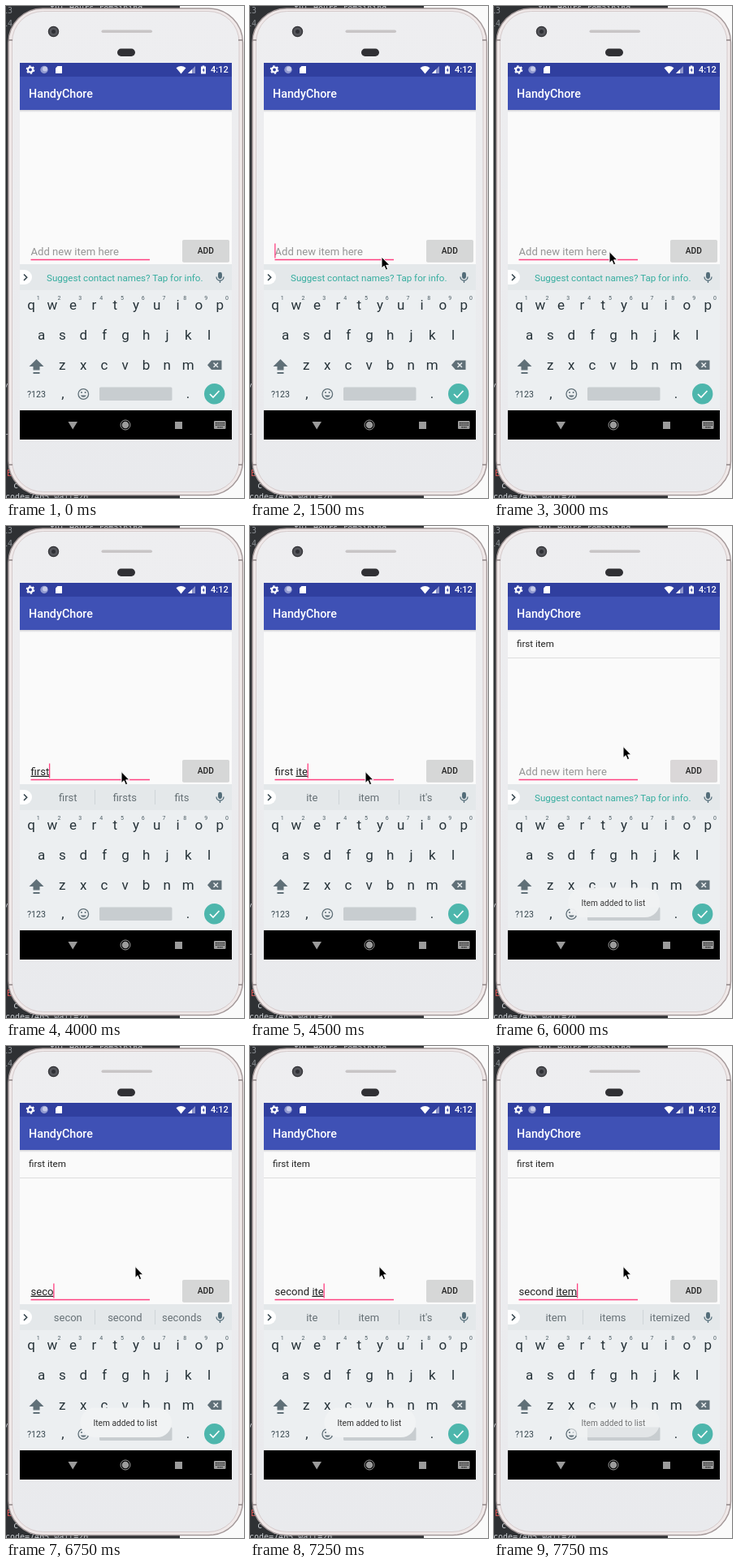
Recreate the animation shown at these times as an HTML page. Size 293 by 606 pixels, loop 8 s.

```html
<!DOCTYPE html>
<html lang="en">
<head>
<meta charset="utf-8">
<style>
  html, body { margin: 0; width: 100%; height: 100%; overflow: hidden; background: #fafafa; }
  svg { display: block; width: 293px; height: 606px; font-family: Roboto, sans-serif; }
  text { white-space: pre; }
  .mid { text-anchor: middle; }
  .code { font: 10px "DejaVu Sans Mono", monospace; fill: #c9cdd2; }
  .word { font-size: 13px; fill: #667075; }
  .key { font-size: 17px; fill: #263238; }
  .digit { font-size: 7px; fill: #4c5c64; }
</style>
</head>
<body>
<svg viewBox="0 0 293 606">
  <defs>
    <linearGradient id="body" x2="0" y2="1">
      <stop stop-color="#eeeef0"/><stop offset="1" stop-color="#e9eaed"/>
    </linearGradient>
    <linearGradient id="shade" x2="0" y2="1">
      <stop stop-color="#cfcfd4"/><stop offset="1" stop-color="#fafafa"/>
    </linearGradient>
  </defs>

  <!-- editor behind the phone -->
  <path d="M0 0H214V606H0z" fill="#2f3134"/>
  <g class="code">
    <text x="-4" y="9" fill="#8b8f94">13</text>
    <text x="-4" y="25" fill="#8b8f94">14</text>
    <text x="54" y="6">ful Hours remaining</text>
    <text x="-3" y="473">/</text><text x="-3" y="533">r</text>
    <text x="1" y="579" style="fill:#e05555">E</text>
    <text x="9" y="594">c</text>
    <text x="-1" y="608">code=7405 wait=20</text>
  </g>

  <!-- phone -->
  <rect x="3" y="3" width="288.500" height="599.500" rx="42" fill="#f0e9e9" stroke="#a59a9b" stroke-width="1.500"/>
  <rect x="7.500" y="6.500" width="279.500" height="592" rx="38" fill="url(#body)" stroke="#d5cacb"/>
  <path d="M3 565H8M286 565H291M3 42H8M286 42H291" stroke="#8f8586" stroke-width="1.500"/>
  <circle cx="58.500" cy="31.500" r="6" fill="#55565b" stroke="#38383c" stroke-width="1.500"/>
  <circle cx="58.500" cy="31.500" r="2.500" fill="#2f3035"/>
  <rect x="117.500" y="29.500" width="62.500" height="3.500" rx="1.700" fill="#c8c5c6"/>
  <rect x="137" y="52.500" width="22" height="9.500" rx="4.700" fill="#303034"/>

  <!-- app -->
  <path d="M17 70H278V534H17z" fill="#fafafa"/>
  <path d="M17 70H278V87H17z" fill="#303f9f"/>
  <path d="M17 87H278V128H17z" fill="#3f51b5"/>
  <path d="M17 128H278V131H17z" fill="url(#shade)"/>
  <g fill="#fff">
    <circle cx="30" cy="78.500" r="3" fill="none" stroke="#fff" stroke-width="2.200"/>
    <circle cx="30" cy="78.500" r="4.600" fill="none" stroke="#fff" stroke-width="1.500" stroke-dasharray="2.400 2.417"/>
    <circle cx="47" cy="78.500" r="4.700" fill="#8f98cf"/><circle cx="48" cy="77.500" r="3" fill="#c5cae9"/>
    <path d="M63.500 74H69V83H61V76.500z"/>
    <path d="M209.500 76.300Q215.500 71.500 221.500 76.300L215.500 83.500z"/>
    <path d="M233 74V83H224z" opacity=".45"/><path d="M229 78V83H224z"/>
    <path d="M241.700 73.500H244.300V74.500H246V83.500H240V74.500H241.700z"/>
    <path d="M243.700 76L241.600 79.500H243V82L244.700 78.500H243.700z" fill="#303f9f"/>
    <text x="252" y="82.300" font-size="11" font-weight="500">4:12</text>
    <text x="28" y="112.500" font-size="14.300" font-weight="500">HandyChore</text>
  </g>
  <g id="row">
    <text x="28" y="149.300" font-size="11.600" fill="#222">first item</text>
    <path d="M17 162.500H278" stroke="#dedede"/>
  </g>
  <text id="hint" x="30.500" y="306.700" font-size="13.100" fill="#959595">Add new item here</text>
  <text id="entry" x="30.500" y="306.700" font-size="13.100" fill="#222"><tspan id="done"></tspan><tspan id="typing" text-decoration="underline"></tspan></text>
  <path d="M30.500 312.500H177" stroke="#ff4081" stroke-width="1.400"/>
  <rect id="caret" y="292.500" width="1.300" height="18" fill="#ff4081"/>
  <rect x="217" y="288.800" width="58" height="27" rx="2" fill="#b9b9b9" opacity=".6"/>
  <rect id="button" x="217" y="288" width="58" height="26.800" rx="2"/>
  <text class="mid" x="245.800" y="304.800" font-size="10.200" font-weight="500" fill="#222">ADD</text>

  <!-- keyboard -->
  <path d="M17 318H278V350H17z" fill="#e4e8ea"/>
  <path d="M17 350H278V499H17z" fill="#eceff1"/>
  <path d="M17 325H23A9 9 0 0 1 23 343H17z" fill="#fff"/>
  <path d="M22 330.500L25.700 334.200L22 338" fill="none" stroke="#37474f" stroke-width="1.600"/>
  <text id="tip" x="50" y="338.800" font-size="11.600" fill="#35ad9f">Suggest contact names? Tap for info.</text>
  <g id="words">
    <path d="M109.500 325V343M183.500 325V343" stroke="#cfd5d8"/>
    <text class="word mid" x="76.300" y="338.800"></text>
    <text class="word mid" x="146.300" y="338.800"></text>
    <text class="word mid" x="216.500" y="338.800"></text>
  </g>
  <g fill="none" stroke="#546e7a" stroke-width="1.300">
    <rect x="261.700" y="328.500" width="3.600" height="7" rx="1.800" fill="#546e7a"/>
    <path d="M259 333.500A4.500 4.700 0 0 0 268 333.500M263.500 338V341"/>
  </g>
  <g id="keys"></g>
  <g fill="#607078">
    <path d="M37.500 435L46.500 444H41.500V448.500H33.500V444H28.500z"/><path d="M33.500 451H41.500V453H33.500z"/>
    <path d="M253 436.500H265.500V448H253L248 442.200z"/>
    <path d="M255.500 439.500L261 445M261 439.500L255.500 445" stroke="#eceff1" stroke-width="1.400"/>
    <text x="26" y="481.800" font-size="10.600" fill="#37474f">?123</text>
    <circle cx="95.300" cy="478" r="6.300" fill="none" stroke="#607078" stroke-width="1.300"/>
    <circle cx="93" cy="476" r="1"/><circle cx="97.600" cy="476" r="1"/>
    <path d="M91.800 479.500A3.700 3.300 0 0 0 98.800 479.500z"/>
  </g>
  <rect x="115" y="469.500" width="89.500" height="16.500" rx="1.500" fill="#c8cdd0"/>
  <circle cx="256.700" cy="477.700" r="12.700" fill="#4db6ac"/>
  <path d="M251 478L255 482L262.500 474" fill="none" stroke="#fff" stroke-width="1.700"/>
  <g id="toast">
    <rect x="91.500" y="445.500" width="112.500" height="36.500" rx="18" fill="#f1f3f4"/>
    <text x="107.500" y="467.700" font-size="10.200" fill="#333">Item added to list</text>
  </g>

  <!-- navigation bar -->
  <path d="M17 498H278V534H17z" fill="#000"/>
  <g fill="#9b9b9b">
    <path d="M76.500 512H88L82.200 521.500z"/>
    <circle cx="147" cy="516" r="4.300"/>
    <circle cx="147" cy="516" r="6" fill="none" stroke="#9b9b9b"/>
    <path d="M208 512H217V521H208z"/>
    <rect x="256" y="511" width="14.500" height="10" rx="1"/>
    <path d="M258 513.700H269M258 516.200H269M260.500 518.900H266.500" stroke="#000" stroke-width="1.300" stroke-dasharray="1.400 1"/>
  </g>

  <path id="pointer" d="M0 0V14L3.200 11.200L5.300 16.200L7.700 15.200L5.600 10.300H10z" fill="#000" stroke="#fff" stroke-width="1"/>
</svg>
<script>
const $ = id => document.getElementById(id);

function addKeys(letters, x, y, digits = '') {
  [...letters].forEach((letter, i) => {
    const cx = x + i * 25.8;
    $('keys').innerHTML += `<text class="key mid" x="${cx}" y="${y}">${letter}</text>` +
      (digits ? `<text class="digit mid" x="${cx + 8.7}" y="362">${digits[i]}</text>` : '');
  });
}
addKeys('qwertyuiop', 31, 374, '1234567890');
addKeys('asdfghjkl', 43.7, 411);
addKeys('zxcvbnm', 69.3, 447.5);
addKeys(',', 70, 483);
addKeys('.', 224, 483);

const idle = '#d6d7d7';
const start = { caret: 0, done: '', typing: '', words: '', mouse: null, row: 0, toast: 0, button: idle };

// Each step lists only what changes at that time.
const steps = [
  [500, { caret: 1 }],
  [750, { mouse: [170, 297] }],
  [1000, { caret: 0, mouse: [162, 309] }],
  [1500, { caret: 1 }],
  [2000, { caret: 0 }],
  [2500, { caret: 1 }],
  [3000, { caret: 0, mouse: [142, 302.5] }],
  [3500, { caret: 1, done: 'fi' }],
  [4000, { done: '', typing: 'first', words: 'first firsts fits' }],
  [4250, { done: 'first ', typing: 'i', words: 'item in into' }],
  [4500, { typing: 'ite', words: "ite item it's" }],
  [4750, { typing: 'item', words: 'item items itemized' }],
  [5000, { mouse: [191, 290] }],
  [5250, { caret: 0, mouse: [233, 313] }],
  [5500, { caret: 1, done: '', typing: '', row: 1, button: '#c6c7c7' }],
  [5750, { words: '', mouse: [200, 286], toast: .4, button: '#d0cfd0' }],
  [6000, { caret: 0, mouse: [159, 271.5], toast: .95, button: '#dad7d8' }],
  [6250, { toast: 1, button: idle }],
  [6500, { caret: 1, typing: 'se' }],
  [6750, { typing: 'seco', words: 'secon second seconds' }],
  [7000, { done: 'second ', typing: 'i', words: 'item in into' }],
  [7250, { typing: 'ite', words: "ite item it's" }],
  [7500, { typing: 'item', words: 'item items itemized' }],
  [7750, { toast: .65 }],
];

const show = (id, on) => $(id).style.display = on ? '' : 'none';

function draw(time) {
  const s = Object.assign({}, start, ...steps.filter(([at]) => at <= time).map(step => step[1]));
  $('done').textContent = s.done;
  $('typing').textContent = s.typing;
  show('hint', !s.done && !s.typing);
  const width = s.done || s.typing ? $('entry').getComputedTextLength() : 0;
  $('caret').setAttribute('x', 30.2 + width);
  show('caret', s.caret);
  show('row', s.row);
  show('tip', !s.words);
  show('words', s.words);
  const words = s.words.split(' ');
  document.querySelectorAll('.word').forEach((el, i) => el.textContent = words[i] || '');
  $('toast').setAttribute('opacity', s.toast);
  $('button').setAttribute('fill', s.button);
  show('pointer', s.mouse);
  if (s.mouse) $('pointer').setAttribute('transform', `translate(${s.mouse})`);
}

const begin = performance.now();
function tick() {
  draw((performance.now() - begin) % 8000);
  requestAnimationFrame(tick);
}
tick();
</script>
</body>
</html>
```
